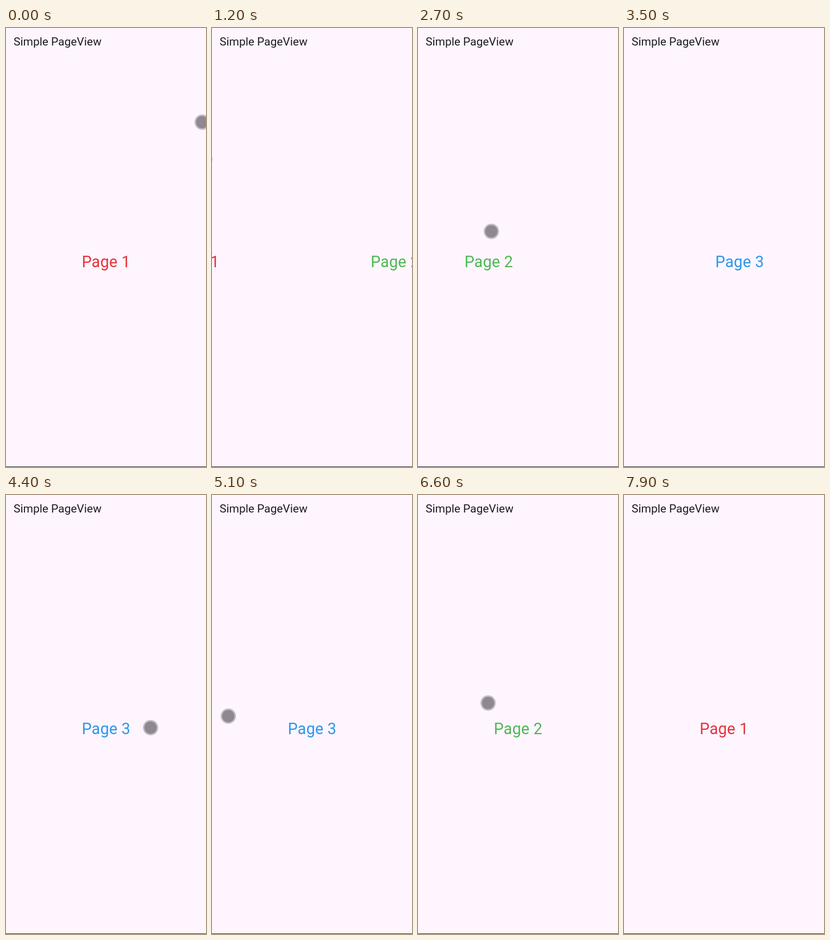
These frames come from a looping animation (368x802 px, 8400 ms). An HTML page:

```html
<!DOCTYPE html>
<html lang="en">
<head>
<meta charset="utf-8">
<title>Simple PageView</title>
<style>
  html, body { margin: 0; width: 100%; height: 100%; overflow: hidden; background: #fef5ff; }
  svg { display: block; width: 368px; height: 802px; font-family: Roboto, sans-serif; }
  #pages { font-size: 28.7px; letter-spacing: 0.23px; text-anchor: middle; }
</style>
</head>
<body>
<svg viewBox="0 0 368 802">
  <rect width="368" height="802" fill="#fef5ff"/>
  <text x="14" y="32" font-size="20.95" fill="#1d1b20">Simple PageView</text>
  <g id="pages">
    <text x="184.2" y="437" fill="#e3343b">Page 1</text>
    <text x="552.2" y="437" fill="#4fb853">Page 2</text>
    <text x="920.2" y="437" fill="#2b98ea">Page 3</text>
  </g>
  <g id="pointer">
    <circle r="14" fill="#c3bac5"/>
    <circle r="11.3" fill="#8f8890"/>
  </g>
  <rect y="801" width="368" height="1" fill="#2e2c30"/>
</svg>
<script>
const LOOP = 8400, STEP = 100, WIDTH = 368;
const pages = document.getElementById('pages');
const pointer = document.getElementById('pointer');

// Pointer moves between two points; "power" eases the end, "bend" bows the path.
// A swipe drags the pages from where x passes "grip" until it lets go.
const moves = [
  { start: 0, end: 1350, a: [361, 172], b: [-40, 243], power: 1.23, bend: 8,
    swipe: { from: 0, to: 1, grip: 154, release: 1125 } },
  { start: 1590, end: 2000, a: [-40, 289], b: [210, 379], power: 1, bend: 0 },
  { start: 2400, end: 3400, a: [210, 379], b: [-40, 368], power: 1, bend: -5,
    swipe: { from: 1, to: 2, grip: 189, release: 3250 } },
  { start: 3750, end: 4400, a: [-40, 392], b: [266, 425], power: 2, bend: 0 },
  { start: 4400, end: 5300, a: [266, 425], b: [5, 404], power: 1.56, bend: -6 },
  { start: 5400, end: 5800, a: [5, 404], b: [308, 438], power: 1.2, bend: 0,
    swipe: { from: 2, to: 1, grip: 5, release: 5700 } },
  { start: 5800, end: 6600, a: [308, 438], b: [129, 380], power: 0.46, bend: -30 },
  { start: 6700, end: 7400, a: [129, 380], b: [390, 150], power: 1, bend: 40,
    swipe: { from: 1, to: 0, grip: 149, release: 7050 } }
];
const swiping = moves.filter(m => m.swipe);

const latest = (list, t) => list.findLast(m => m.start <= t);

function place(m, t) {
  const u = Math.min(1, (t - m.start) / (m.end - m.start));
  const p = 1 - (1 - u) ** m.power;
  const [x, y] = m.a.map((from, i) => from + (m.b[i] - from) * p);
  return [x, y + m.bend * 4 * p * (1 - p)];
}

// Overdamped spring: distance left after s seconds
function spring(dist, speed, s) {
  const slow = 9.08, fast = 22;
  const k = (fast * dist - speed) / (fast - slow);
  const left = k * Math.exp(-slow * s) + (dist - k) * Math.exp(-fast * s);
  return Math.abs(left) < 0.1 ? 0 : left;
}

function scrollAt(t) {
  const m = latest(swiping, t);
  const { from, to, grip, release } = m.swipe;
  const dir = to - from;
  const drag = time => Math.max(0, dir * (grip - place(m, time)[0]));
  let moved = drag(t);
  if (t >= release) {
    const dist = drag(release);
    const speed = (dist - drag(release - 100)) * 10;
    moved = WIDTH - spring(WIDTH - dist, speed, (t - release) / 1000);
  }
  return from * WIDTH + dir * moved;
}

function draw(ms) {
  const t = Math.floor((ms % LOOP) / STEP) * STEP;
  pages.setAttribute('transform', `translate(${-scrollAt(t)} 0)`);
  pointer.setAttribute('transform', `translate(${place(latest(moves, t), t)})`);
}

let begin;
function tick(now) {
  begin ??= now;
  draw(now - begin);
  requestAnimationFrame(tick);
}
draw(0);
requestAnimationFrame(tick);
</script>
</body>
</html>
```
